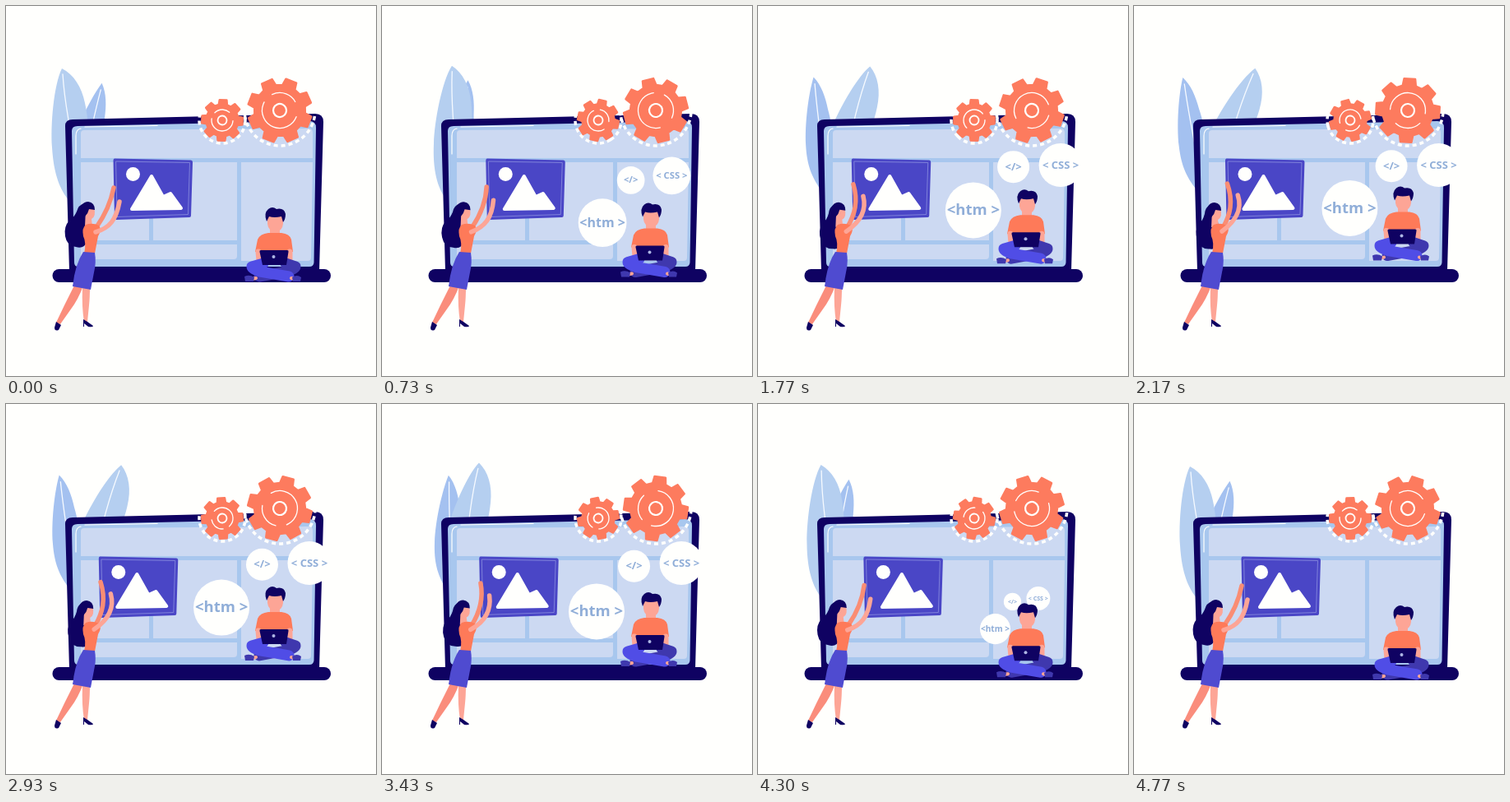
An HTML page that plays this animation: 450 px wide and 450 px high, repeating every 4.81 s.

```html
<!DOCTYPE html>
<html lang="en">
<head>
<meta charset="utf-8">
<title>Building a web page</title>
<style>
  html, body { margin: 0; width: 100%; height: 100%; overflow: hidden; background: #fffffd; }
  svg { display: block; width: 100vw; height: 100vh; }
  text { font-family: "Noto Sans", sans-serif; font-weight: 600; fill: #90aed8; text-anchor: middle; }
  .line { fill: none; stroke-linecap: round; stroke-linejoin: round; }
  .navy { fill: #0f0262; }
  .skin { fill: #fda596; }
</style>
</head>
<body>
<svg viewBox="0 0 450 450">
  <!-- leaves -->
  <g id="leafBack">
    <path fill="#a4c1f0" d="M58 87C53 108 51 145 54 170C57 195 64 208 74 221H92C92 190 87 150 78 125C74 110 68 96 58 87Z"/>
    <path class="line" stroke="#f6faff" stroke-width="1.3" d="M60 95Q66 135 78 190"/>
  </g>
  <g id="leafFront">
    <path fill="#b5cff0" d="M68 76C58 96 54 145 56 172C58 205 66 225 78 238H98C102 200 103 150 96 118C92 98 82 83 68 76Z"/>
    <path class="line" stroke="#f6faff" stroke-width="1.3" d="M69 83Q72 130 90 205"/>
  </g>

  <!-- computer -->
  <path class="navy" d="M72 146Q72 138 81 138L376 131Q386 131 386 141L381 322H77Z"/>
  <rect class="navy" x="56.500" y="320" width="338.500" height="16" rx="8"/>
  <path fill="#a8c7ee" d="M80 152Q80 146 87 146L369 140Q377 140 377 148L374.500 312Q374 317 369 317H88Q83 317 83 312Z"/>
  <g fill="#ccd9f2">
    <path d="M91 155Q91 151 95 151L368 149Q373 149 373 154V185H91Z"/>
    <path d="M91 190H174V285H91ZM179 190H281V285H179ZM91 290H281V304Q281 308 277 308H95Q91 308 91 304ZM286 190H373L371 306Q371 310 367 310H286Z"/>
  </g>
  <path class="line" stroke="#fffffd" stroke-width="1.200" d="M96 147L184 145.500M85 180V158Q85 150 91 149"/>

  <!-- gears -->
  <g id="gears"></g>

  <!-- code bubbles -->
  <g id="bubbles"></g>

  <!-- seated man -->
  <g id="man">
    <path class="skin" d="M321 268H333V282H321Z"/>
    <path fill="#fe7a59" d="M319 276H335Q345 277 347 284L349 299H341L340 306H313L311 299H303L306 284Q309 277 319 276Z"/>
    <path class="line" stroke="#fda596" stroke-width="7" d="M307 299L308 310L315 314M345 299L345 310L338 314"/>
    <path class="skin" d="M318 255H337V265Q336 274 328 274Q319 274 318 265Z"/>
    <path class="navy" d="M317 262Q313 252 319 247Q324 243 329 247Q338 245 340 253Q340 259 337 263L335 256Q326 258 320 256Z"/>
    <path class="line" stroke="#3f38ae" stroke-width="13" d="M340 313L352 317Q352 320 341 323L308 329"/>
    <path class="line" stroke="#504de6" stroke-width="13" d="M313 313L299 317Q299 320 309 323L344 329"/>
    <path class="line" stroke="#fda596" stroke-width="4" d="M299 332L304 331M347 331L351 332"/>
    <path fill="#3f38ae" d="M290 329Q296 326 302 330L301 335H291ZM348 330Q354 326 359 330L358 335H349Z"/>
    <path class="navy" d="M310 297H342Q344 297 343.500 299L341 315H312L308.500 299Q308 297 310 297Z"/>
    <circle cx="325.500" cy="305" r="2" fill="#aeb6e4"/>
  </g>

  <!-- picture tile -->
  <g id="tile">
    <path fill="#4a46c6" d="M132 185.500L225 187.500Q227 187.500 227 190L225 255Q225 257 223 257L134 260Q132 260 132 258L130.500 188Q130.500 185.500 132 185.500Z"/>
    <path class="line" stroke="#8c90e0" stroke-width=".8" d="M134 189L223.500 190.500L221.500 253.500L135.500 256.500Z"/>
    <circle cx="154.500" cy="204.500" r="8.500" fill="#fffffd"/>
    <path class="line" style="fill:#fffffd" stroke="#fffffd" stroke-width="4" d="M153 247L177 207L191 232L200 228L213 246Z"/>
  </g>

  <!-- standing woman -->
  <path id="armBack" class="line" stroke="#fa8d74" stroke-width="5.500"/>
  <path id="hair" class="navy" d="M95 240Q88 242 86 250Q83 257 77 261Q70 268 72 280Q74 292 85 293Q95 296 99 286L101 250Z"/>
  <g id="head">
    <path class="skin" d="M97 246L107 245Q110 256 104 259L105 268H96Z"/>
    <path class="navy" d="M91 252Q90 238 100 238Q108 239 108 248L101 247Q100 252 96 256Z"/>
  </g>
  <path fill="#fe7a59" d="M97 266Q105 263 113 267Q117 272 112 280L108 301H95Q98 288 94 280Q92 270 97 266Z"/>
  <path id="armFront" class="line" stroke="#fda596" stroke-width="5.500"/>
  <path fill="#fa8d7c" d="M83 340H94Q88 357 78 370L66 387L61 385L71 364Z"/>
  <path class="skin" d="M93 342H102Q102 355 101 364L99 384H95Q92 366 93 342Z"/>
  <path fill="#4f4bd0" d="M94 299L108 300Q110 312 107 324L103 345L81 341Q84 314 94 299Z"/>
  <path class="navy" d="M61 384L67 388L64 394Q59 396 59 391ZM94 381L99 384L106 389Q106 391 100 390L95 386L95 390H94Z"/>
</svg>

<script>
const LOOP = 4810;
const LAPTOP = [324, 288];
const el = id => document.getElementById(id);
const set = (node, value) => node.setAttribute("transform", value);
const polar = (r, deg) => {
  const a = deg * Math.PI / 180;
  return (r * Math.cos(a)).toFixed(2) + " " + (r * Math.sin(a)).toFixed(2);
};

function gearPath(outer, root) {
  const points = [];
  for (let mid = 0; mid < 360; mid += 45) {
    points.push(polar(root, mid - 15), polar(outer, mid - 10), polar(outer, mid + 10), polar(root, mid + 15));
  }
  return "M" + points.join("L") + "Z";
}

const gears = [
  { x: 263, y: 139, outer: 25, root: 19.5, hub: 5.5, arc: 13, ring: 28, width: 1.8, phase: 2.5 },
  { x: 333, y: 127, outer: 39, root: 31, hub: 8, arc: 21.5, ring: 43, width: 2.2, phase: 21 }
];
el("gears").innerHTML = gears.map(g => `<g>
  <circle r="${g.ring}" fill="none" stroke="#fffffd" stroke-width="3.500" stroke-dasharray="5 4"/>
  <path d="${gearPath(g.outer, g.root)}" fill="#fd7b5e" stroke="#fd7b5e" stroke-width="2.500" stroke-linejoin="round"/>
  <g class="line" stroke="#fffffd" stroke-width="${g.width}">
    <circle r="${g.hub}"/>
    <circle r="${g.arc}" pathLength="100" stroke-dasharray="52 10 24 14" stroke-width="1.300"/>
  </g></g>`).join("");

// dx and dy are the swing around the resting point
const bubbles = [
  { x: 260.5, y: 254.5, dx: -2, dy: 9, r: 34, size: 18.5, text: "&lt;htm &gt;" },
  { x: 304.5, y: 198, dx: -9, dy: 3.5, r: 19.5, size: 13, text: "&lt;/&gt;" },
  { x: 362, y: 193.5, dx: -9, dy: 0, r: 26.5, size: 13, text: "&lt; CSS &gt;" }
];
el("bubbles").innerHTML = bubbles.map(b => `<g>
  <circle r="${b.r}" fill="#fffffd"/>
  <text y="${b.size * 0.31}" font-size="${b.size}">${b.text}</text></g>`).join("");

const arms = {
  armBack: [[110, 269, 122, 252, 128, 236, 131, 221], [108, 270, 117, 254, 121, 238, 113, 216]],
  armFront: [[109, 275, 126, 270, 134, 260, 138, 238], [107, 274, 120, 264, 133, 250, 126, 230]]
};
const armPath = ([from, to], k) => {
  const p = from.map((v, i) => v + (to[i] - v) * k);
  return `M${p[0]} ${p[1]}C${p.slice(2).join(" ")}`;
};

function draw(now) {
  const t = now % LOOP / LOOP;
  const swing = Math.cos(t * 2 * Math.PI);
  const k = (1 - swing) / 2;

  set(el("leafFront"), `rotate(${28.5 * k} 108 236)`);
  set(el("leafBack"), `rotate(${23.2 * (1 - k)} 71 233)`);
  set(el("tile"), `translate(${-20 * k} 0)`);
  set(el("man"), `translate(0 ${-26 * k})`);
  set(el("head"), `translate(${-2 * k} ${k})`);
  set(el("hair"), `translate(${-k} ${k}) rotate(${-10 * k} 98 246)`);
  for (const id in arms) el(id).setAttribute("d", armPath(arms[id], k));

  gears.forEach((g, i) =>
    set(el("gears").children[i], `translate(${g.x} ${g.y}) rotate(${360 * t + g.phase})`));

  // bubbles grow out of the man's laptop and sink back into it
  const edge = Math.min(1, t / 0.2, (1 - t) / 0.2);
  const scale = (1 - Math.cos(edge * Math.PI)) / 2;
  bubbles.forEach((b, i) => {
    const x = LAPTOP[0] + (b.x + b.dx * swing - LAPTOP[0]) * scale;
    const y = LAPTOP[1] + (b.y + b.dy * swing - LAPTOP[1]) * scale;
    set(el("bubbles").children[i], `translate(${x} ${y}) scale(${scale})`);
  });
  requestAnimationFrame(() => draw(performance.now()));
}
draw(0);
</script>
</body>
</html>
```
